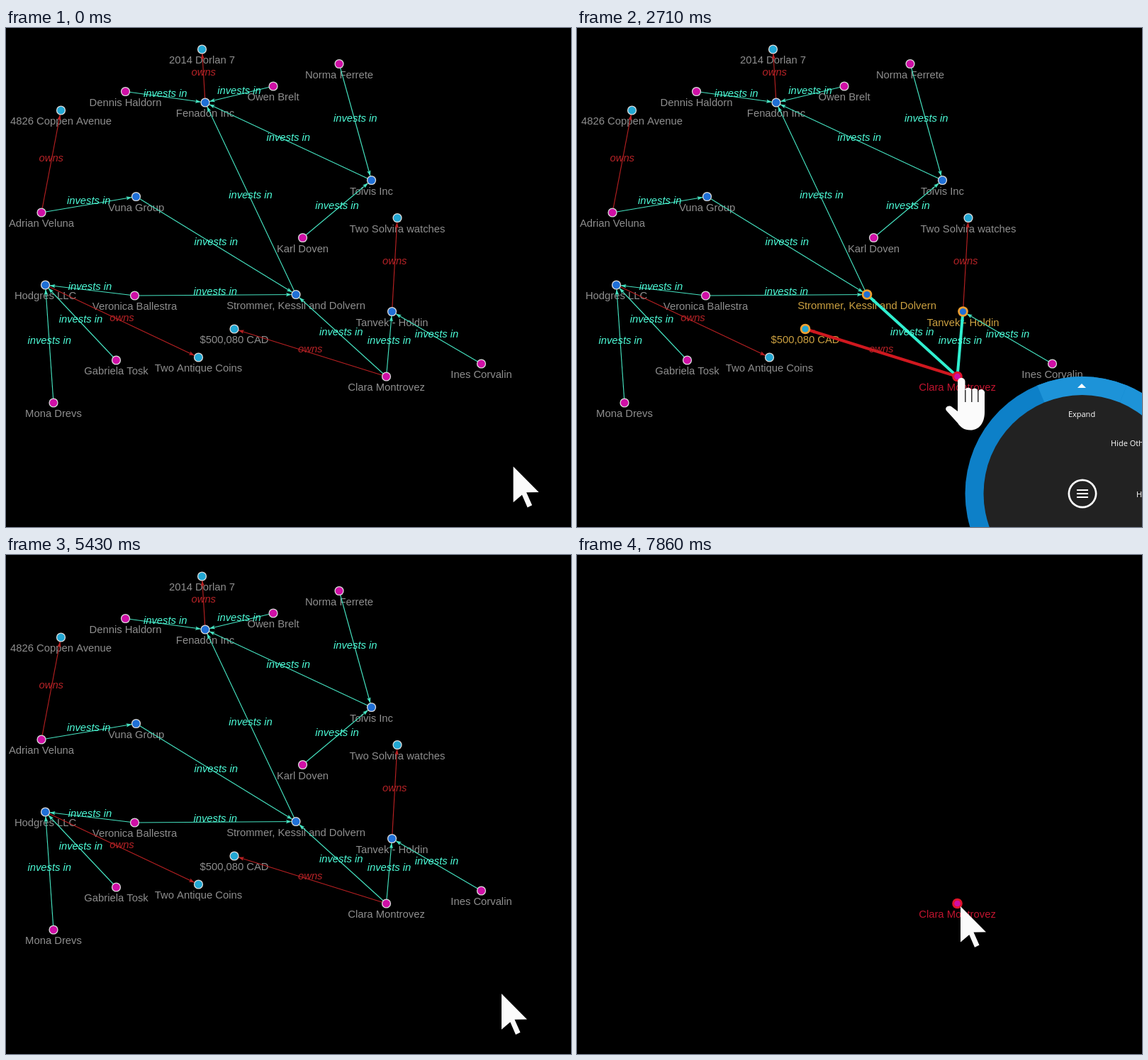
An HTML page with a canvas that plays this animation: 797 px wide and 703 px high, repeating every 8 s.

```html
<!DOCTYPE html>
<html>
<head>
<meta charset="utf-8">
<style>
html, body { margin: 0; width: 100%; height: 100%; overflow: hidden; background: #000; }
canvas { display: block; }
</style>
</head>
<body>
<canvas id="stage" width="797" height="703"></canvas>
<script>
const ctx = document.getElementById('stage').getContext('2d');
const LOOP = 8000, STEP = 1000 / 7;
const SANS = '"Liberation Sans", Arial, sans-serif';
const MENU_FONT = '11px "Open Sans", "Noto Sans", sans-serif';
const FILL = { person: '#cf0fa6', firm: '#1f6fd6', asset: '#22a7d3' };

const nodes = {
  a: ['asset', 276.5, 30, '2014 Dorlan 7'],
  b: ['person', 470, 50.5, 'Norma Ferrete'],
  c: ['person', 168.5, 89.5, 'Dennis Haldorn'],
  d: ['person', 377, 82, 'Owen Brelt'],
  e: ['firm', 281, 105, 'Fenadon Inc'],
  f: ['asset', 77.5, 116, '4826 Coppen Avenue'],
  g: ['firm', 515.5, 214.5, 'Tolvis Inc'],
  h: ['person', 50, 260, 'Adrian Veluna'],
  i: ['firm', 183.5, 237.5, 'Vuna Group'],
  j: ['person', 418.5, 295.5, 'Karl Doven'],
  k: ['asset', 552, 267.5, 'Two Solvira watches'],
  l: ['firm', 55.5, 362, 'Hodgres LLC'],
  m: ['person', 181.5, 377, 'Veronica Ballestra'],
  n: ['firm', 409, 375.5, 'Strommer, Kessil and Dolvern'],
  o: ['firm', 544.5, 399.5, 'Tanvek - Holdin'],
  p: ['asset', 322, 424, '$500,080 CAD'],
  q: ['person', 155.5, 468, 'Gabriela Tosk'],
  r: ['asset', 271.5, 464, 'Two Antique Coins'],
  s: ['person', 67, 528, 'Mona Drevs'],
  t: ['person', 536.5, 491, 'Clara Montrovez'],
  u: ['person', 670.5, 473, 'Ines Corvalin']
};
const edges = 'ce de ea bg ge jg ne hf hi in ml mn lr ql sl tn tp to ok uo'.split(' ');
const HUB = 't', NEAR = 'nop';

function text(str, x, y, color, font, align = 'center') {
  ctx.font = font;
  ctx.textAlign = align;
  ctx.fillStyle = color;
  ctx.fillText(str, x, y);
}

function poly(points, color) {
  ctx.fillStyle = color;
  ctx.beginPath();
  points.forEach(([x, y]) => ctx.lineTo(x, y));
  ctx.fill();
}

function stroke(points, color, width) {
  ctx.strokeStyle = color;
  ctx.lineWidth = width;
  ctx.beginPath();
  points.forEach(([x, y], i) => i ? ctx.lineTo(x, y) : ctx.moveTo(x, y));
  ctx.stroke();
}

function disc(x, y, r, color) {
  ctx.fillStyle = color;
  ctx.beginPath();
  ctx.arc(x, y, r, 0, 7);
  ctx.fill();
}

function drawEdge([from, to], active) {
  const [, x1, y1] = nodes[from], [kind, x2, y2] = nodes[to];
  const owns = kind === 'asset', lit = active && from === HUB;
  const color = lit ? (owns ? '#d0181f' : '#30efd0') : owns ? '#b82022' : '#45e2c0';
  stroke([[x1, y1], [x2, y2]], color, lit ? 4 : 1.15);
  ctx.save();
  ctx.translate(x2, y2);
  ctx.rotate(Math.atan2(y2 - y1, x2 - x1));
  poly([[-6, 0], [-14, -2.7], [-12.5, 0], [-14, 2.7]], color);
  ctx.restore();
}

function drawEdgeLabel([from, to]) {
  const [, x1, y1] = nodes[from], [kind, x2, y2] = nodes[to];
  const owns = kind === 'asset';
  text(owns ? 'owns' : 'invests in', (x1 + x2) / 2, (y1 + y2) / 2 - 0.4,
    owns ? '#b42226' : '#4cfad6', 'italic 14.8px ' + SANS);
}

function drawGraph(active, alone) {
  const ids = alone ? [HUB] : Object.keys(nodes);
  const links = alone ? [] : edges;
  const pick = (id, hub, near, plain) =>
    active && id === HUB ? hub : active && NEAR.includes(id) ? near : plain;
  for (const id of ids) {
    const [, x, y, name] = nodes[id];
    text(name, x, y + 20, pick(id, '#c0142f', '#cba040', '#8e8e8e'), '14.8px ' + SANS);
  }
  links.forEach(e => drawEdge(e, active));
  for (const id of ids) {
    const [kind, x, y] = nodes[id];
    disc(x, y, pick(id, 7.3, 7.3, 6.6), pick(id, '#e0142c', '#f0a030', '#dcdcdc'));
    disc(x, y, pick(id, 4.3, 4.6, 5.3), FILL[kind]);
  }
  links.forEach(drawEdgeLabel);
}

function drawRadial(hover) {
  const x = 712.5, y = 656, slice = Math.PI / 4;
  disc(x, y, 165, '#0d80c8');
  for (let i = 0; i < 2; i++) {
    const start = (i - 2.5) * slice;
    ctx.fillStyle = i && hover ? '#3a9ce8' : '#1d93d8';
    ctx.beginPath();
    ctx.moveTo(x, y);
    ctx.arc(x, y, 165, start, start + slice);
    ctx.fill();
  }
  disc(x, y, 139, '#222');
  poly([[706, 507], [712, 501], [718, 507]], '#fff');
  text('Expand', 712, 548, '#fff', MENU_FONT);
  text('Hide Others', 753, 589, '#fff', MENU_FONT, 'left');
  text('Hide', 789, 661, '#fff', MENU_FONT, 'left');
  disc(713, 656, 20.5, '#fff');
  disc(713, 656, 17.8, '#222');
  for (const dy of [-5, 0, 5]) stroke([[705, y + dy], [721, y + dy]], '#fff', 2);
}

function drawList() {
  ctx.fillStyle = '#2d2d31';
  ctx.fillRect(655, 603, 112, 100);
  ctx.strokeStyle = '#46464c';
  ctx.lineWidth = 1;
  ctx.strokeRect(655.5, 603.5, 111, 110);
  ['only me', '1 more level', '2 more levels', '3 more levels', '4 more levels'].forEach((row, i) =>
    text('Leave ' + row, 660, 620 + i * 19.5, '#fff', MENU_FONT, 'left'));
}

const arrow = [[0, 0], [36, 36.3], [18.5, 36.5], [26.5, 54.5], [20, 57.7], [12.3, 40], [0, 50.5]];
const hand = new Path2D('M537 498a5.2 5.2 0 0 1 10.5 0V510a4.6 4.6 0 0 1 9 1a4.6 4.6 0 0 1 9 1.5' +
  'a4.8 4.8 0 0 1 9.5 3V541c0 16-8 25.5-20 25.5c-9 0-14-4-18-10L521 539c-3-4 3-9 8-5l8 6z');

function drawHand() {
  ctx.fillStyle = '#fbfbfb';
  ctx.fill(hand);
  for (const x of [547.8, 556.8, 565.8]) stroke([[x, 510], [x, 527]], '#111', 1.3);
}

const clamp = u => Math.max(0, Math.min(1, u));
const bezier = (a, c, b, u) => a.map((v, i) =>
  v * (1 - u) ** 2 + 2 * c[i] * u * (1 - u) + b[i] * u * u);
const line = (a, b, u) => a.map((v, i) => v + (b[i] - v) * clamp(u));

function pointer(s) {
  const node = [541, 495], row = [699, 618];
  if (s < 15) return bezier([715.6, 617.8], [633.6, 628.5], node, clamp((s - 6) / 8));
  if (s < 28) return line(node, [806, 560], (s - 20) / 4);
  if (s < 32) return line([806, 588], [707, 626], (s - 28) / 3);
  if (s < 44) return line([707, 626], row, (s - 31) / 3);
  return line(row, node, (s - 44) / 7);
}

function draw(t) {
  const s = Math.floor((t + 6) / STEP) % 56;
  const within = (from, to) => s >= from && s < to;
  ctx.fillStyle = '#000';
  ctx.fillRect(0, 0, 797, 703);
  drawGraph(within(14, 21) || s >= 51, s >= 44);
  if (within(17, 30)) drawRadial(s >= 23);
  if (within(30, 36)) drawList();
  if (within(15, 21) || within(52, 55)) {
    drawHand();
  } else {
    const [px, py] = pointer(s);
    poly(arrow.map(([x, y]) => [px + x, py + y]), '#fbfbfb');
  }
}

const begin = performance.now();
function tick() {
  draw((performance.now() - begin) % LOOP);
  requestAnimationFrame(tick);
}
tick();
</script>
</body>
</html>
```
